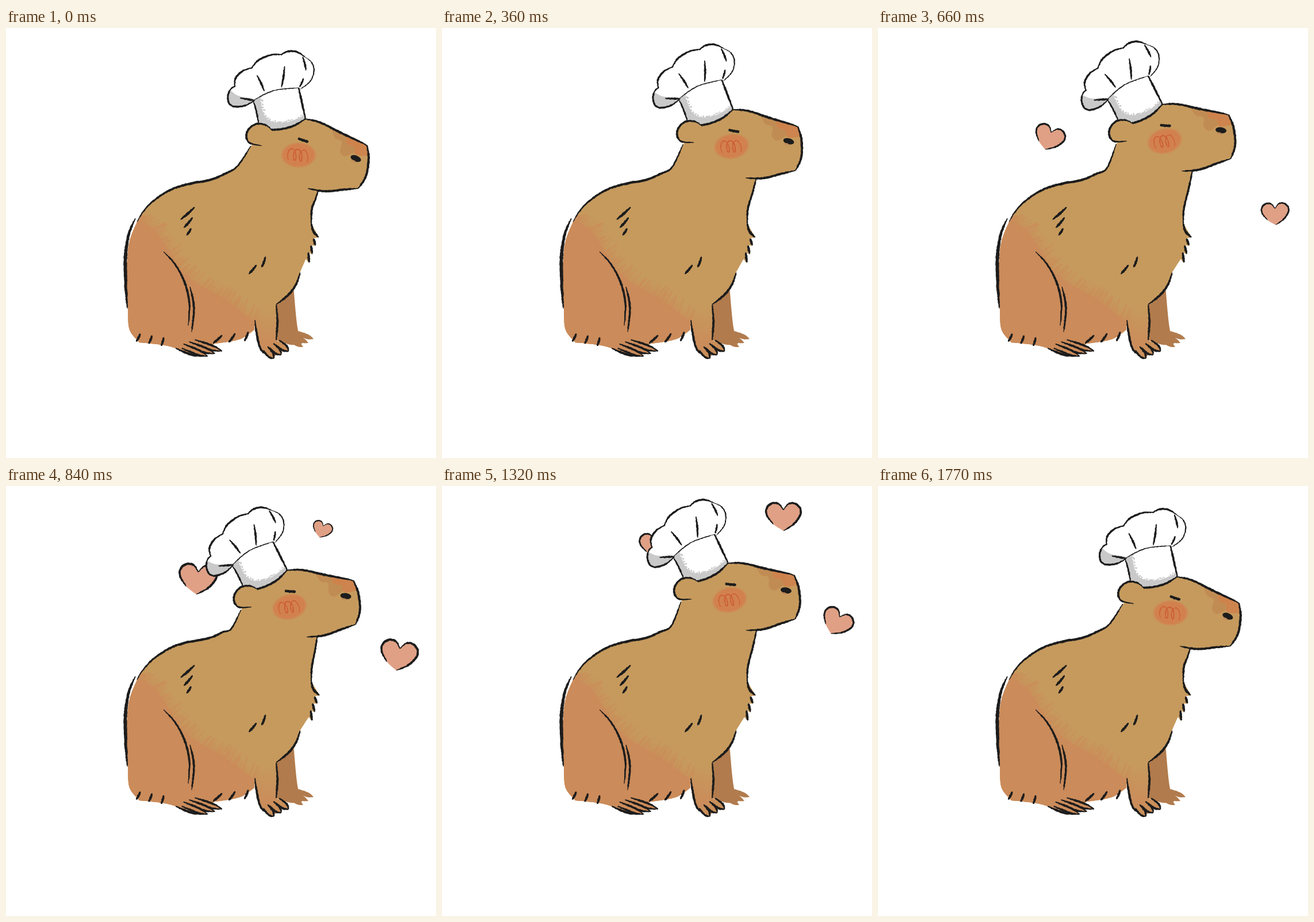
Animation, 748 px wide and 748 px high, one loop 1.8 s. Source, as an HTML page with a canvas:

```html
<!DOCTYPE html>
<html lang="en">
<head>
<meta charset="utf-8">
<title>Capybara chef</title>
<style>
html, body { margin: 0; width: 100%; height: 100%; overflow: hidden; background: #fff; }
canvas { display: block; width: 748px; height: 748px; }
</style>
</head>
<body>
<canvas id="stage" width="748" height="748"></canvas>
<script>
const ctx = document.getElementById('stage').getContext('2d');
const INK = '#1c1c1c', FUR = '#c69a5d', RUST = '#cb8b5a', LEG = '#b17b4d', PINK = '#e0a085', GREY = '#c9c9c9';
const LOOP = 1800, SLOT = 30, STEP = 37.5, RAD = Math.PI / 180;

const noise = n => { const v = Math.sin(n * 127.1 + 11.7) * 43758.5453; return v - Math.floor(v); };
const clamp = v => Math.max(0, Math.min(1, v));
const ease = v => { v = clamp(v); return v * v * (3 - 2 * v); };
const lerp = (a, b, u) => a + (b - a) * u;
const mix = (a, b, u) => a.map((v, j) => lerp(v, b[j], u));
const times = (n, fn) => Array.from({ length: n }, (_, i) => fn(i));

// "x,y x,y ..." to points
const P = s => s.split(' ').map(q => q.split(',').map(Number));

// Catmull-Rom samples through the points
function curve(pts) {
  const out = [];
  for (let i = 0; i < pts.length - 1; i++) {
    const b = pts[i], c = pts[i + 1], a = pts[i - 1] || b, d = pts[i + 2] || c;
    const n = Math.max(2, Math.ceil(Math.hypot(c[0] - b[0], c[1] - b[1]) / 2.5));
    for (let k = 0; k < n; k++) {
      const u = k / n;
      out.push([0, 1].map(j => b[j] + 0.5 * u * (c[j] - a[j] +
        u * (2 * a[j] - 5 * b[j] + 4 * c[j] - d[j] + u * (3 * (b[j] - c[j]) + d[j] - a[j])))));
    }
  }
  out.push(pts[pts.length - 1]);
  return out;
}

function trace(pts) {
  ctx.beginPath();
  pts.forEach(p => ctx.lineTo(p[0], p[1]));
  ctx.closePath();
}

// Smooth pieces joined by corners
const outline = (...parts) => trace(parts.flatMap(curve));

function blob(color, ...parts) {
  outline(...parts);
  ctx.fillStyle = color;
  ctx.fill();
}

function oval(color, x, y, rx, ry, turn = 0) {
  ctx.beginPath();
  ctx.ellipse(x, y, rx, ry, turn, 0, 7);
  ctx.fillStyle = color;
  ctx.fill();
}

// Rough pencil stroke, thinner at both ends
function brush(pts, w, tip = 0.25, color = INK) {
  const c = curve(pts), L = [], R = [], n = c.length - 1;
  c.forEach((p, i) => {
    const a = c[Math.max(0, i - 1)], b = c[Math.min(n, i + 1)];
    const dx = b[0] - a[0], dy = b[1] - a[1], d = Math.hypot(dx, dy) || 1;
    const h = w / 2 * (tip + (1 - tip) * Math.pow(Math.sin(Math.PI * i / n) + 1e-6, 0.6));
    const l = h + (noise(i) - 0.5) * Math.min(1, h), r = h + (noise(i + 50) - 0.5) * Math.min(1, h);
    L.push([p[0] - dy / d * l, p[1] + dx / d * l]);
    R.unshift([p[0] + dy / d * r, p[1] - dx / d * r]);
  });
  trace(L.concat(R));
  ctx.fillStyle = color;
  ctx.fill();
}

// Short stroke around a centre
function tick(x, y, len, deg, w = 4.4) {
  const dx = Math.cos(deg * RAD) * len / 2, dy = Math.sin(deg * RAD) * len / 2;
  brush([[x - dx, y - dy], [x + 0.8, y], [x + dx, y + dy]], w, 0.1);
}

function clipped(draw) {
  ctx.save();
  ctx.clip();
  draw();
  ctx.restore();
}

// Each heart swells and shrinks while passing x, y, tilt at given steps
const hearts = [
  { born: 9, end: 40, size: 1.17, path: [[17, 298, 191, 20], [28, 376, 127, -12], [35, 370, 102, -5]] },
  { born: 11, end: 40, size: 1.2, path: [[17, 691, 323, -2], [28, 674, 261, 24], [35, 687, 237, 28]] },
  { born: 18, end: 45, size: 1.05, path: [[28, 550, 76, 19], [35, 594, 53, 0], [40, 590, 29, -16]] }
];
const lobe = P('0,-11 -8,-21 -19,-22 -28,-14 -28,-2 -17,13 0,24');
const mirror = lobe.map(([x, y]) => [-x, y]);

function heart({ born, end, size, path }, f) {
  if (f <= born || f >= end) return;
  const s = size * Math.sqrt(Math.sin(Math.PI * Math.pow((f - born) / (end - born), 1.2)));
  const [a, b] = f < path[1][0] ? path : path.slice(1);
  const [, x, y, tilt] = mix(a, b, clamp((f - a[0]) / (b[0] - a[0])));
  ctx.save();
  ctx.translate(x, y);
  ctx.rotate(tilt * RAD);
  ctx.scale(s, s);
  blob(PINK, lobe, mirror.slice().reverse());
  brush(lobe.slice(0, 6), 3.8, 0.2);
  brush(mirror, 3.8, 0.15);
  ctx.restore();
}

// Three toes, each a pointed leaf
function paw(base, tip, step, w, color, ink) {
  for (let i = 0; i < 3; i++) {
    const b = base.map((v, j) => v + step[j] * i * 0.8), t = tip.map((v, j) => v + step[j] * i);
    const d = Math.hypot(t[0] - b[0], t[1] - b[1]), n = [(b[1] - t[1]) / d * w, (t[0] - b[0]) / d * w];
    const edge = k => [0, 0.65, 1].map(u => mix(b, t, u).map((v, j) => v + n[j] * k * (u < 1 ? 1 : 0)));
    blob(color, edge(-1), edge(1).reverse());
    if (ink) [-1, 1].forEach(k => brush(edge(k), 3.6, 0.25));
  }
}

const spine = P('355,264 315,272 285,282 255,302 237,322 228,337');
const rump = P('228,337 214,375 210,430 212,490 215,525 232,547');
const sole = P('232,547 270,551 295,557 322,568 345,571');
const belly = P('362,549 385,546 410,540 432,525');
const shin = P('433,508 436,530 444,560 464,573');
const foreleg = P('470,543 472,510 470,481');
const brisket = P('470,481 490,465 504,447 512,425');

function body({ p, dip, nape, throat }) {
  const bend = [403 - 4 * p - 8 * dip, 240 + 3 * p + 6 * dip];
  const back = [nape, bend, [380 - p - 2 * dip, 254], ...spine];
  const chest = [[531, 340], [532, 314], mix(throat, [533, 314], 0.5), throat];
  const sway = ([x, y]) => [x + 5 * p * clamp((y - 350) / 50), y];
  const tips = times(4, i => sway([544 - 5.5 * i, 364 + 15 * i]));
  const pits = times(4, i => sway([535 - 4.5 * i, 366 + 12 * i]));
  const fur = [chest[0], ...tips.flatMap((t, i) => [t, pits[i]])].reverse();

  outline(back, rump, sole, belly, shin, [[490, 556], [470, 543]], foreleg, brisket.slice(0, 3),
    [[511, 426], fur[0]], ...fur.slice(1).map((q, i) => [fur[i], q]), chest, [[470, 230], nape]);
  ctx.fillStyle = FUR;
  ctx.fill();
  clipped(rust);

  brush(back, 4.2, 0.2);
  brush(P('225,331 214,358 208,395 208,440 211,488'), 6, 0.12);
  brush(chest, 3.7, 0.4);
  brush([chest[0], [535, 354], tips[0]], 4.4, 0.3);
  pits.slice(0, 3).forEach((q, i) => brush([q, mix(q, tips[i + 1], 0.5), mix(q, tips[i + 1], 0.95)], 4.6, 0.1));
  brush(brisket, 4.2, 0.15);
  brush(foreleg, 3.8, 0.3);
  brush(shin, 4, 0.2);
  brush(sole.slice(2), 4, 0.2);
  paw([327, 546], [376, 562], [-12.5, 4.5], 4, RUST, true);
  paw([472, 547], [492, 562], [-13, 6.5], 5, '#ca8f5a', true);
  marks();
}

function rust() {
  const edge = curve(P('224,330 262,356 312,429 380,472 434,512'));
  ctx.save();
  ctx.shadowColor = RUST;
  ctx.shadowBlur = 20;
  trace(edge.concat(P('434,600 190,600 190,326')));
  ctx.fillStyle = RUST;
  ctx.fill();
  ctx.restore();
  ctx.lineCap = 'round';
  ctx.strokeStyle = 'rgba(203,139,90,.5)';
  for (let i = 0; i < 110; i++) {
    const u = noise(i + 200), q = edge[Math.floor(u * (edge.length - 1))];
    const a = -0.25 - u, n = 8 + 18 * noise(i + 400);
    ctx.lineWidth = 1 + 1.6 * noise(i + 600);
    ctx.beginPath();
    ctx.moveTo(q[0] - 8 * Math.cos(a), q[1] - 8 * Math.sin(a));
    ctx.lineTo(q[0] + n * Math.cos(a), q[1] + n * Math.sin(a));
    ctx.stroke();
  }
  const g = ctx.createLinearGradient(0, 485, 0, 550);
  g.addColorStop(0, 'rgba(203,139,90,0)');
  g.addColorStop(1, 'rgba(203,139,90,.9)');
  ctx.fillStyle = g;
  ctx.fillRect(433, 480, 65, 100);
}

function marks() {
  brush(P('274,389 295,412 312,446 319,482 317,518'), 3.8, 0.15);
  brush(P('320,450 327,485 323,529'), 3.8, 0.15);
  for (let i = 0; i < 3; i++) {
    tick(316 + i, 322.5 + 16 * i, 33 - 9 * i, 138 - 8 * i);
    tick(230 + 21 * i, 538.5 + 3.5 * i, 16, 116 - 5 * i);
    tick(368 + 25 * i, 541.5 - 2.5 * i, 22 - 2 * i, 138 - 13 * i);
  }
  tick(448, 407, 20, 109);
  tick(429, 420, 21, 130);
}

function hat() {
  const left = P('431,127 416,135 398,137 388,131 386,118 391,106 399,101');
  const crown = [P('398,103 399,88 411,75 429,69'), P('427,70 439,56 460,47 480,46'), P('478,47 489,41 505,41 520,50')];
  const right = P('519,50 531,59 536,74 529,93 511,107');
  const side = P('509,104 515,130 521,158'), hem = P('521,158 496,172 463,177 440,170');
  const seam = P('440,170 436,148 430,126'), band = P('430,126 465,109 509,104');
  blob('#fff', left, ...crown, right, side, hem, seam);
  outline(left, P('399,101 440,110'));
  clipped(() => blob(GREY, P('386,104 402,117 424,122 436,125'), P('436,140 380,142')));
  outline(band, side, hem, seam);
  clipped(() => {
    const rim = curve(P('430,122 441,123 452,156 482,165 524,151'));
    blob(GREY, rim, P('524,180 438,180'));
    rim.forEach(([x, y], i) =>
      oval(GREY, x + noise(i) * 5 - 2, y + noise(i + 9) * 5 - 3, 1 + noise(i + 20), 1 + noise(i + 30)));
  });
  [left, ...crown].forEach(c => brush(c, 3.4, 0.4));
  brush(right, 2.2, 0.2);
  brush(band, 1.8, 0.4);
  brush(seam, 2.8, 0.4);
  brush(side, 3.6, 0.5);
  brush(hem, 4, 0.3);
  tick(443, 96, 31, 65, 3.5);
  tick(482, 85, 38, 98, 3.5);
  tick(519, 62, 25, 76, 3.5);
  tick(514, 95, 17, 114, 3.5);
  tick(420, 124, 27, 10, 3.5);
}

function cheek() {
  const g = ctx.createRadialGradient(0, 0, 0, 0, 0, 1);
  g.addColorStop(0.82, 'rgba(210,128,78,.97)');
  g.addColorStop(1, 'rgba(210,128,78,0)');
  ctx.save();
  ctx.translate(509, 221);
  ctx.scale(32, 23);
  oval(g, 0, 0, 1, 1);
  ctx.restore();
  const loops = times(41, i => {
    const u = i / 40, a = u * 6 * Math.PI;
    return [492 + 31 * u - 4.5 * Math.sin(a), 219 + 4 * u + 10 * Math.cos(a)];
  });
  brush(loops, 1.7, 0.6, '#cc5b30');
}

function face() {
  const brow = P('519,158 546,164 580,181 628,204'), muzzle = P('628,204 631,228 626,258 613,279');
  const chin = P('613,279 590,281 555,284 525,279');
  const ear = P('464,179 452,169 436,167 423,175 418,188 424,200 445,205');
  outline(P('427,205 436,180 460,172 521,158'), brow, muzzle, chin, P('525,280 480,292 445,250'));
  ctx.fillStyle = FUR;
  ctx.fill();
  clipped(() => {
    blob('rgba(184,118,68,.4)', P('567,176 572,191 584,198 581,214 590,223 612,211 606,194 567,176'));
    blob('rgba(208,128,76,.85)', P('592,188 594,201 606,207 608,220 633,220 636,200 592,188'));
  });
  cheek();
  hat();
  blob(FUR, ear);
  brush(ear, 3.8, 0.15);
  brush(brow, 4.2, 0.3);
  brush(muzzle, 4.2, 0.4);
  brush(chin, 4.2, 0.15);
  brush(P('508,192 516,195 526,198'), 4.8, 0.6);
  oval(INK, 608.5, 227, 9.6, 5.2, 0.4);
  brush(P('600,230 604,231 609,234'), 3, 0.2, '#bd8a58');
}

function draw(f) {
  // rise, one soft nod while raised, return
  const p = ease(f / 16) * (1 - ease((f - 32) / 16));
  const dip = ease((f - 16) / 8) * (1 - ease((f - 24) / 8));
  const turn = -14.3 * p * RAD, cos = Math.cos(turn), sin = Math.sin(turn);
  const px = 411, py = 257, cx = px + 2 * p - 7 * dip, cy = py - 2 * p + 17 * dip;
  const place = (x, y) => [cx + (x - px) * cos - (y - py) * sin, cy + (x - px) * sin + (y - py) * cos];
  ctx.fillStyle = '#fff';
  ctx.fillRect(0, 0, 748, 748);
  hearts.forEach(h => heart(h, f));
  blob(LEG, P('468,482 486,468 500,449'), P('500,449 508,526 520,530'), P('515,549 495,551 470,543'));
  paw([508, 531], [535, 541], [-9, 7], 4, LEG);
  body({ p, dip, nape: place(426, 205), throat: place(543, 283) });
  ctx.save();
  ctx.translate(cx, cy);
  ctx.rotate(turn);
  ctx.translate(-px, -py);
  face();
  ctx.restore();
}

const start = performance.now();
let last = -1;
function loop() {
  const t = Math.max(0, performance.now() - start) % LOOP;
  const f = Math.floor(Math.floor(t / SLOT) * SLOT / STEP + 1e-6);
  if (f !== last) draw(last = f);
  requestAnimationFrame(loop);
}
loop();
</script>
</body>
</html>
```
